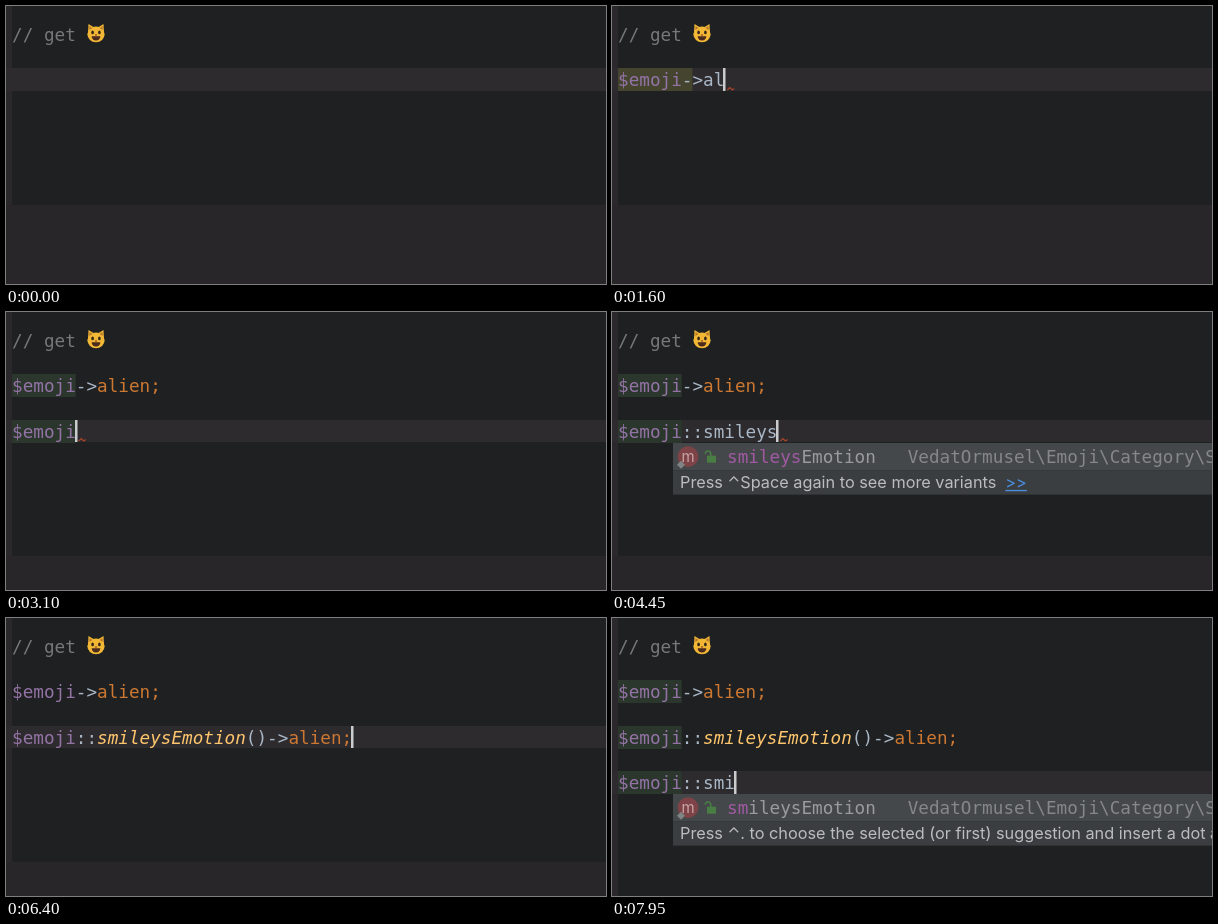
Animation, 600 px wide and 278 px high, one loop 8 s. Source, as an HTML page with a canvas:

```html
<!DOCTYPE html>
<html lang="en">
<head>
<meta charset="utf-8">
<title>Code completion</title>
<style>
html, body { margin: 0; width: 100%; height: 100%; overflow: hidden; background: #1e2021; }
canvas { display: block; }
</style>
</head>
<body>
<canvas id="stage" width="600" height="278"></canvas>
<script>
const ctx = document.getElementById('stage').getContext('2d');
const W = 600, H = 278, LOOP = 8000;
const LEFT = 6, ADVANCE = 10.63, LINE = 22.7, ROW = 27.3;
const MONO = '17.65px "DejaVu Sans Mono", monospace';
const SANS = '16.3px Inter, "DejaVu Sans", sans-serif';
const NAMESPACE = 'VedatOrmusel\\Emoji\\';

const colors = {
  editor: '#1e2021', panel: '#282628', gutter: '#2a282a', current: '#2e2b2e',
  olive: '#45452f', green: '#2b362d', comment: '#767879',
  variable: '#9373a5', plain: '#a9b7c6', field: '#cc7832', method: '#ffc66d',
  popup: '#313435', selected: '#45484a', hint: '#3b3e40',
  item: '#999b9c', type: '#858788', match: '#a05aa3'
};

// Edits: the text of a line from a given time on
const edits = [];
const setLine = (line, text, time) => edits.push({ line, text, time });
const type = (line, before, added, start, gap) => {
  for (let i = 1; i <= added.length; i++) {
    setLine(line, before + added.slice(0, i), start + (i - 1) * gap);
  }
};
const CALL = '$emoji::smileysEmotion()';

setLine(3, '', 0);
type(3, '', '$emoji', 350, 120);
type(3, '$emoji', '->al', 1200, 130);
setLine(3, '$emoji->alien', 2000);
setLine(3, '$emoji->alien;', 2150);
setLine(4, '', 2350);
setLine(5, '', 2450);
type(5, '', '$emoji', 2580, 95);
type(5, '$emoji', '::smileys', 3350, 115);
setLine(5, CALL, 4700);
type(5, CALL, '->', 5250, 150);
setLine(5, CALL + '->alien', 6100);
setLine(5, CALL + '->alien;', 6250);
setLine(6, '', 6420);
setLine(7, '', 6530);
type(7, '', '$emoji', 6680, 125);
type(7, '$emoji', '::smi', 7450, 120);

const AGAIN = 'Press ⌃Space again to see more variants';
const DOT = 'Press ⌃. to choose the selected (or first) suggestion and insert a dot afterwards';
const variables = ['emoji'];
const emotion = ['smileysEmotion'];
const methods = ['smileysEmotion', 'activities', 'animalsNature', 'flags', 'foodDrink', 'objects'];
const filtered = ['alien', 'alienMonster', 'alembic', 'flagAlbania', 'flagAlgeria', 'balloon', 'medal'];
const fields = ['alien', 'grinningCat', 'alienMonster', 'angerSymbol', 'angryFace', 'angryFaceWithHorns'];

const popups = [
  { from: 400, to: 980, line: 3, col: 1, icon: '$', items: variables, hint: DOT },
  { from: 1680, to: 2000, line: 3, col: 8, icon: 'f', items: filtered },
  { from: 2650, to: 3070, line: 5, col: 1, icon: '$', items: variables, hint: DOT },
  { from: 3560, to: 3760, line: 5, col: 8, icon: 'm', items: methods },
  { from: 3760, to: 4700, line: 5, col: 8, icon: 'm', items: emotion, hint: AGAIN },
  { from: 5500, to: 6100, line: 5, col: 26, icon: 'f', items: fields },
  { from: 6730, to: 7340, line: 7, col: 1, icon: '$', items: variables, hint: DOT },
  { from: 7650, to: 7790, line: 7, col: 8, icon: 'm', items: methods },
  { from: 7790, to: LOOP, line: 7, col: 8, icon: 'm', items: emotion, hint: DOT }
];

const highlights = [
  { from: 1000, to: 1330, lines: [3], length: 6, color: colors.green },
  { from: 1400, to: 2200, lines: [3], length: 7, color: colors.olive },
  { from: 3080, to: 4700, lines: [3, 5], length: 6, color: colors.green },
  { from: 5400, to: 6300, lines: [5], length: 25, color: colors.olive },
  { from: 7400, to: LOOP, lines: [3, 5, 7], length: 6, color: colors.green }
];

const errors = [
  { from: 1400, to: 2000 }, { from: 3080, to: 4700 }, { from: 5400, to: 6100 }
];

const active = t => span => t >= span.from && t < span.to;
const lineTop = line => 62.3 + (line - 3) * LINE;
const columnX = col => LEFT + col * ADVANCE;

function rect(x, y, w, h, color) {
  ctx.fillStyle = color;
  ctx.fillRect(x, y, w, h);
}

function ellipse(x, y, rx, ry, color) {
  ctx.fillStyle = color;
  ctx.beginPath();
  ctx.ellipse(x, y, rx, ry, 0, 0, Math.PI * 2);
  ctx.fill();
}

function polygon(points, color) {
  ctx.fillStyle = color;
  ctx.beginPath();
  points.forEach(([x, y]) => ctx.lineTo(x, y));
  ctx.fill();
}

function mono(text, x, y, color, italic) {
  ctx.font = (italic ? 'italic ' : '') + MONO;
  ctx.fillStyle = color;
  [...text].forEach((char, i) => ctx.fillText(char, x + i * ADVANCE, y));
}

function code(text, line) {
  let x = LEFT;
  const y = lineTop(line) + 17.9;
  for (const token of text.split(/(\$[a-z]*|smileysEmotion(?=\()|alien|;)/)) {
    const called = token === 'smileysEmotion';
    const color = token[0] === '$' ? colors.variable
      : called ? colors.method
      : token === 'alien' || token === ';' ? colors.field : colors.plain;
    mono(token, x, y, color, called);
    x += token.length * ADVANCE;
  }
}

function cat(x, y) {
  const fur = '#f2b835';
  polygon([[x - 8, y], [x - 7.5, y - 10], [x - 1, y - 6]], fur);
  polygon([[x + 8, y], [x + 7.5, y - 10], [x + 1, y - 6]], fur);
  ellipse(x, y + 0.3, 8.6, 7.9, fur);
  for (const side of [-1, 1]) {
    polygon([[x + side * 6.6, y - 4], [x + side * 6.5, y - 8], [x + side * 3.6, y - 6]], '#b8742c');
    ellipse(x + side * 3.4, y - 1.6, 1.3, 1.9, '#33251a');
  }
  ellipse(x, y + 1, 1.2, 0.8, '#8b4a2b');
  ctx.fillStyle = '#4a2b1d';
  ctx.beginPath();
  ctx.arc(x, y + 2.3, 4.3, 0, Math.PI);
  ctx.fill();
}

function badge(x, y, letter) {
  const isMethod = letter === 'm';
  ellipse(x, y, 10.4, 10.4, isMethod ? '#7d4347' : '#805c2c');
  ctx.font = '15px Inter, sans-serif';
  ctx.textAlign = 'center';
  ctx.fillStyle = isMethod ? '#c9a5a6' : '#c9a66b';
  if (!isMethod) ctx.fillStyle = '#2f2a21';
  ctx.fillText(letter, x, y + 5);
  ctx.textAlign = 'left';
  if (!isMethod) return;
  polygon([[x - 7, y + 4], [x - 3, y + 8], [x - 7, y + 12], [x - 11, y + 8]], '#7f8485');
  const lockX = x + 23;
  rect(lockX - 4, y - 1, 9, 7, '#4a7d43');
  ctx.strokeStyle = '#4a7d43';
  ctx.lineWidth = 1.6;
  ctx.beginPath();
  ctx.arc(lockX - 3, y - 3, 2.7, Math.PI, 0);
  ctx.lineTo(lockX - 0.3, y);
  ctx.stroke();
}

function drawHint(text, x, y) {
  ctx.font = SANS;
  ctx.fillStyle = '#bbbcbd';
  ctx.fillText(text, x, y);
  if (text !== AGAIN) return;
  const linkX = x + ctx.measureText(text).width + 9;
  ctx.fillStyle = '#4b8fe2';
  ctx.fillText('>>', linkX, y);
  ctx.fillRect(linkX, y + 2, ctx.measureText('>>').width, 1.3);
}

function drawPopup({ line, col, icon, items, hint }, prefix) {
  const left = Math.round(columnX(col) - 30.5);
  const top = Math.round(lineTop(line + 1) + 0.6);
  const textX = left + (icon === 'm' ? 54 : 31);
  rect(left, top, W - left, items.length * ROW, colors.popup);
  rect(left, top, W - left, ROW, colors.selected);

  items.forEach((name, i) => {
    const y = top + i * ROW;
    const matched = prefix && name.startsWith(prefix) ? prefix.length : 0;
    badge(left + 15, y + 13.7, icon);
    mono(name.slice(0, matched), textX, y + 19.5, colors.match);
    mono(name.slice(matched), textX + matched * ADVANCE, y + 19.5, colors.item);
    if (icon === 'm') {
      mono(NAMESPACE + 'Category\\S', textX + 17 * ADVANCE, y + 19.5, colors.type);
    } else if (icon === '$') {
      mono(NAMESPACE + 'Emoji', 390, y + 19.5, colors.type);
    }
  });

  if (hint) {
    const y = top + items.length * ROW;
    rect(left, y, W - left, 24.3, colors.hint);
    drawHint(hint, left + 7, y + 17.6);
  }
}

function squiggle(x, y) {
  ctx.strokeStyle = '#a8452a';
  ctx.lineWidth = 1.2;
  ctx.beginPath();
  ctx.moveTo(x, y + 2);
  ctx.lineTo(x + 2.5, y - 0.5);
  ctx.lineTo(x + 5, y + 2);
  ctx.lineTo(x + 7, y + 0.5);
  ctx.stroke();
}

function documentAt(t) {
  const lines = {};
  let caret = 3;
  for (const { line, text, time } of edits) {
    if (time > t) break;
    lines[line] = text;
    caret = line;
  }
  return { lines, caret };
}

function draw(t) {
  const { lines, caret } = documentAt(t);
  const top = Math.round(lineTop(caret));
  const bottom = Math.round(lineTop(caret + 1));
  const caretX = columnX(lines[caret].length);

  rect(0, 0, W, H, colors.panel);
  rect(0, 0, LEFT, H, colors.gutter);
  rect(LEFT, 0, W - LEFT, bottom + 114, colors.editor);
  rect(0, bottom + 114, W, H, colors.panel);
  rect(0, top, W, bottom - top, colors.current);

  for (const mark of highlights.filter(active(t))) {
    for (const line of mark.lines) {
      const y = Math.round(lineTop(line));
      rect(LEFT, y, mark.length * ADVANCE, 23, mark.color);
    }
  }

  mono('// get', LEFT, lineTop(1) + 17.9, colors.comment);
  cat(90, 28);
  for (const line in lines) code(lines[line], +line);

  if (errors.some(active(t))) squiggle(caretX + 3, bottom - 3);
  if (t >= 150) rect(Math.round(caretX) - 1, top, 2.5, bottom - top, '#c9cbcc');

  // Suggestions follow the typing with a short delay
  const earlier = documentAt(t - 60).lines;
  for (const popup of popups.filter(active(t))) {
    drawPopup(popup, (earlier[popup.line] || '').slice(popup.col));
  }
}

const start = performance.now();
function tick() {
  draw((performance.now() - start) % LOOP);
  requestAnimationFrame(tick);
}
tick();
</script>
</body>
</html>
```
